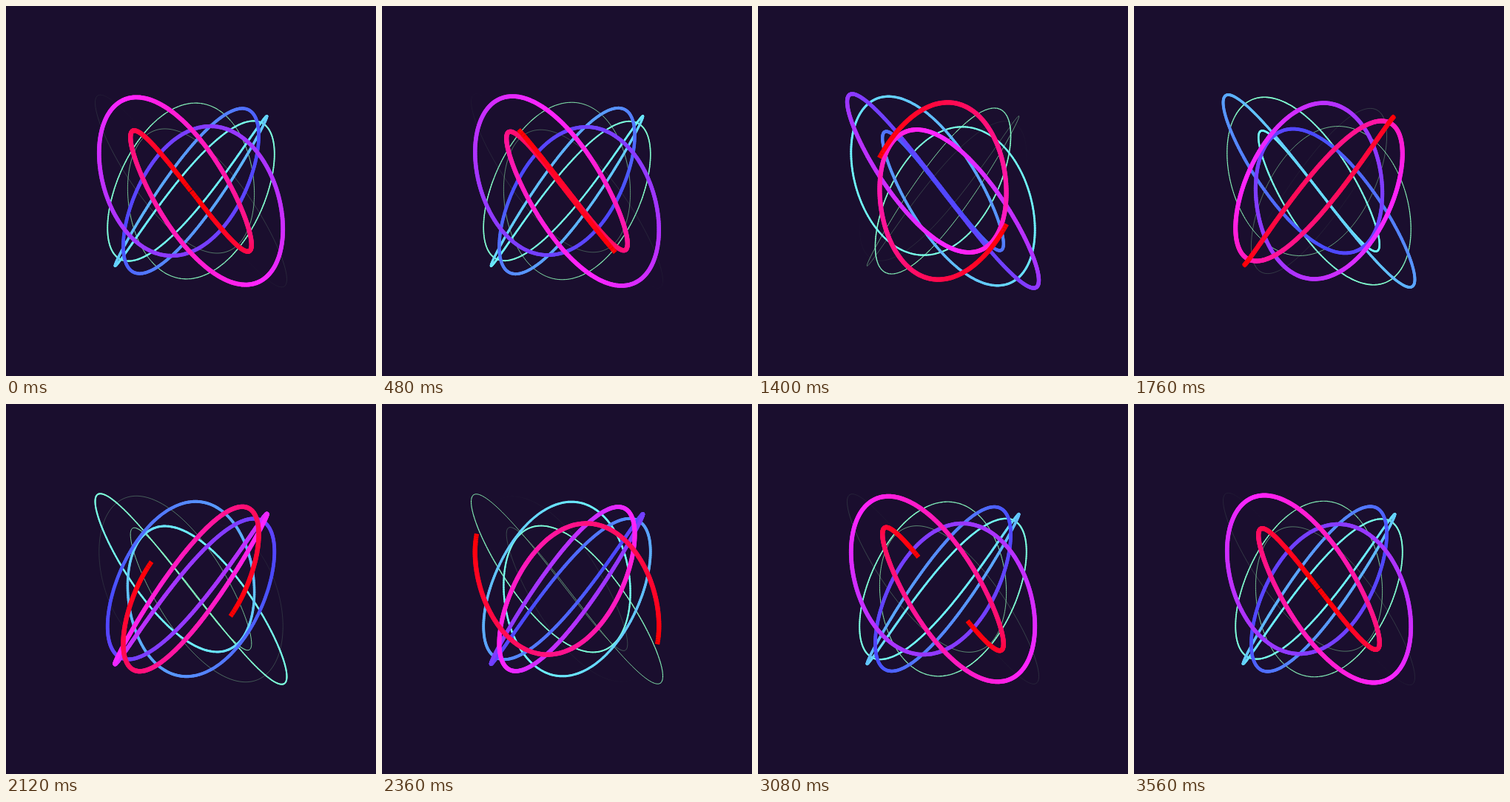
These frames come from a looping animation (500x500 px, 3600 ms). An HTML page with a canvas:

```html
<!DOCTYPE html>
<html lang="en">
<head>
<meta charset="utf-8">
<title>Twin ribbons</title>
<style>
  html, body { margin: 0; width: 100%; height: 100%; overflow: hidden; background: #1a0e2e; }
  canvas { display: block; width: 500px; height: 500px; }
</style>
</head>
<body>
<canvas id="stage" width="500" height="500"></canvas>
<script>
const { PI, sin, cos } = Math;
const ctx = document.getElementById('stage').getContext('2d');
const LOOP = 3600, STEPS = 900, WIDTH = 6.3;

const ease = u => u * u * u * (u * (6 * u - 15) + 10);

// Ribbon style at share s of its length, 0 at the head and 1 at the tail
function style(s) {
  const k = sin(s * PI / 2);
  return {
    color: `hsl(${360 - 235 * k}, ${100 - 45 * s ** 4}%, ${50 + 28 * k}%)`,
    width: WIDTH * (1 + cos(PI * s)) / 2
  };
}
const styles = Array.from({ length: STEPS }, (_, i) => style((i + 0.5) / STEPS));

// 7:9 Lissajous figure on a slowly swinging centre
function point(a, sway) {
  const size = 106 - 4 * sin(a) ** 2;
  const sx = sin(7 * a - 0.2 + 0.025 * sin(2 * a));
  return [
    size * sx + (20.5 + 4 * sx * sx) * cos(a),
    size * sin(9 * a - 0.236) + (24.5 + sway) * cos(a)
  ];
}

function line(p, q, sign) {
  ctx.beginPath();
  ctx.moveTo(250 + sign * p[0], 250 + sign * p[1]);
  ctx.lineTo(250 + sign * q[0], 250 + sign * q[1]);
  ctx.stroke();
}

function headAngle(t) {
  const u = t + 0.0195 - 0.006 * cos(4 * PI * t);
  return PI * ease(u % 1);
}

function draw(t) {
  const head = headAngle(t);
  const sway = 2 * sin(2 * PI * t);
  ctx.fillStyle = '#1a0e2e';
  ctx.fillRect(0, 0, 500, 500);
  let p = point(head - PI, sway);
  for (let i = STEPS - 1; i >= 0; i--) {
    const q = point(head - PI * i / STEPS, sway);
    const { color, width } = styles[i];
    ctx.strokeStyle = color;
    ctx.lineWidth = width;
    ctx.lineCap = width > 1.4 && i > 3 ? 'round' : 'butt';
    line(p, q, 1);
    line(p, q, -1);
    p = q;
  }
}

const start = performance.now();
function tick() {
  draw((performance.now() - start) % LOOP / LOOP);
  requestAnimationFrame(tick);
}
tick();
</script>
</body>
</html>
```
